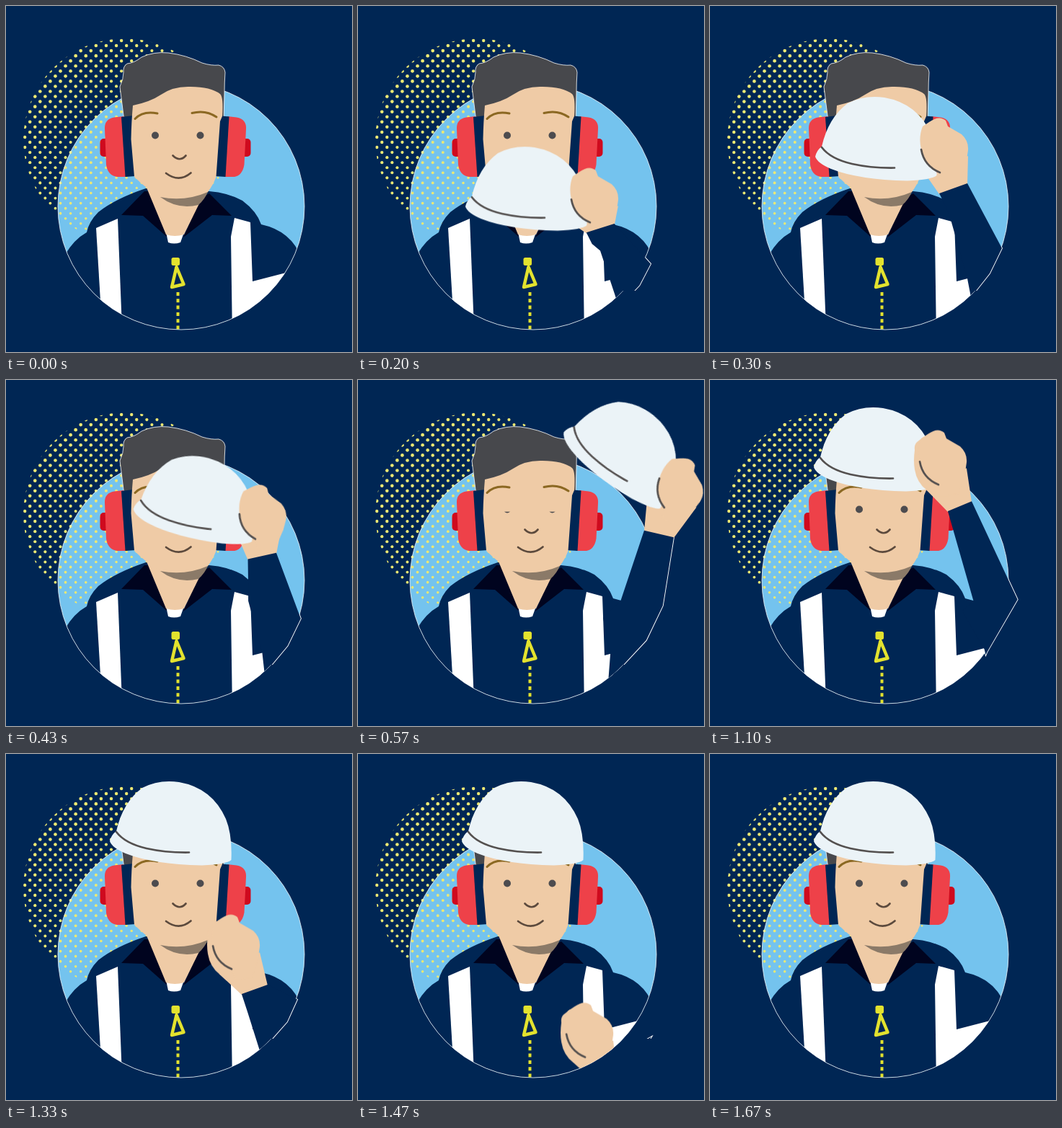
Write an HTML page that moves like this. It is 480 by 480 pixels and loops after 2730 ms.

```html
<!DOCTYPE html>
<html lang="en">
<head>
<meta charset="utf-8">
<title>Hard hat on</title>
<style>
  html, body { margin: 0; width: 100%; height: 100%; overflow: hidden; background: #002654; }
  svg { display: block; width: 100vw; height: 100vh; }

  .navy { fill: #002654; }
  .white { fill: #fff; }
  .skin { fill: #efcba6; }
  .collar { fill: #00041f; }
  .cup { fill: #ee4149; }
  .knob { fill: #cf0a1e; }
  .ink { fill: none; stroke: #54504f; stroke-width: 2.7; stroke-linecap: round; }
  .feature { stroke: #5c4a3d; }
  .brow { stroke: #8b6822; stroke-width: 3; }
  .edge { fill: none; stroke: #fff; stroke-width: 1.8; }

  .swing, .drop, .sleeve, .wrist, .lid, .thumb { animation: 2730ms linear infinite; }
  .swing { animation-name: swing; transform-origin: 153px 107px; }
  .drop { animation-name: drop; }
  .sleeve { animation-name: sleeve; }
  .wrist { animation-name: wrist; }
  .lid { animation-name: blink; }
  .thumb { animation-name: thumb; }

  /* The hat rises past the face, swings out to the side and lands on the head. */
  @keyframes swing {
    0%, 3% { transform: translate(16px, 420px) rotate(0deg); animation-timing-function: cubic-bezier(.3, .4, .5, 1); }
    11% { transform: translate(2px, 88px) rotate(0deg); }
    13% { transform: translate(2px, 88px) rotate(0deg); animation-timing-function: ease-in-out; }
    21.6% { transform: translate(149px, -44px) rotate(30deg); }
    23.4% { transform: translate(149px, -44px) rotate(30deg); animation-timing-function: ease-in; }
    26.74% { transform: translate(42px, -25px) rotate(10deg); animation-timing-function: ease-out; }
    30.4%, 100% { transform: translate(0, 0) rotate(0deg); }
  }
  @keyframes drop {
    0%, 39.5% { transform: translate(0, 0); animation-timing-function: ease-in; }
    48.7% { transform: translate(-4px, 154px); }
    58.6%, 100% { transform: translate(0, 390px); }
  }
  @keyframes sleeve {
    0%, 3% { d: path("M312 520 L350 515 L410 440 L400 450 L361 470 L352 480 L340 490 L312 520Z"); animation-timing-function: cubic-bezier(.3, .4, .5, 1); }
    11% { d: path("M318 260 L357 246 L405 336 L388 371 L362 404 L357 378 L335 300 L328 280Z"); }
    13% { d: path("M318 260 L357 246 L405 336 L388 371 L362 404 L357 378 L335 300 L328 280Z"); animation-timing-function: ease-in-out; }
    21.6% { d: path("M398 208 L439 218 L423 313 L400 361 L347 418 L350 380 L340 330 L365 306Z"); }
    23.4% { d: path("M398 208 L439 218 L423 313 L400 361 L347 418 L350 380 L340 330 L365 306Z"); animation-timing-function: ease-in; }
    26.74% { d: path("M351 184 L392 175 L426 308 L378 393 L369 402 L369 376 L350 320 L367 306Z"); animation-timing-function: ease-out; }
    30.4% { d: path("M330 180 L363 166 L427 304 L384 378 L383 381 L381 373 L350 320 L366 306Z"); }
    39.5% { d: path("M330 180 L363 166 L427 304 L384 378 L383 381 L381 373 L350 320 L366 306Z"); animation-timing-function: ease-in; }
    48.7% { d: path("M327 332 L363 319 L404 340 L390 371 L353 413 L352 411 L335 357 L327 332Z"); }
    58.6%, 100% { d: path("M312 520 L350 515 L410 440 L400 450 L361 470 L352 480 L340 490 L312 520Z"); }
  }
  @keyframes wrist {
    0%, 3% { d: path("M316 570 L372 540 L351 516 L312 521Z"); animation-timing-function: cubic-bezier(.3, .4, .5, 1); }
    11% { d: path("M302 238 L358 208 L357 248 L318 261Z"); }
    13% { d: path("M302 238 L358 208 L357 248 L318 261Z"); animation-timing-function: ease-in-out; }
    21.6% { d: path("M402 168 L471 176 L439 219 L398 209Z"); }
    23.4% { d: path("M402 168 L471 176 L439 219 L398 209Z"); animation-timing-function: ease-in; }
    26.74% { d: path("M330 149 L392 129 L390 176 L351 185Z"); animation-timing-function: ease-out; }
    30.4% { d: path("M300 150 L356 120 L363 167 L330 181Z"); }
    39.5% { d: path("M300 150 L356 120 L363 167 L330 181Z"); animation-timing-function: ease-in; }
    48.7% { d: path("M296 304 L352 274 L363 320 L327 333Z"); }
    58.6%, 100% { d: path("M300 540 L356 510 L351 516 L312 521Z"); }
  }
  @keyframes blink {
    0%, 16% { transform: translateY(0); }
    20%, 23.4% { transform: translateY(8.7px); }
    26.74% { transform: translateY(4.5px); }
    29.5%, 100% { transform: translateY(0); }
  }
  /* The thumb stays behind the brim until the hand lets go. */
  @keyframes thumb {
    0%, 39.8% { opacity: 0; }
    39.81%, 100% { opacity: 1; }
  }
</style>
</head>
<body>
<svg viewBox="0 0 480 480">
  <defs>
    <clipPath id="disc"><circle cx="243" cy="278" r="171"/></clipPath>
    <clipPath id="halo"><circle cx="165" cy="186" r="141"/></clipPath>
    <clipPath id="reach">
      <circle cx="243" cy="278" r="171"/>
      <rect width="480" height="395"/>
    </clipPath>
  </defs>
  <rect class="navy" width="480" height="480"/>

  <g clip-path="url(#reach)"><path class="sleeve edge"/></g>
  <circle cx="243" cy="278" r="171" fill="#74c3ee"/>
  <g id="dots" fill="#ece873" clip-path="url(#halo)"></g>

  <g clip-path="url(#disc)">
    <path class="navy" d="M194 253 Q152 267 128 286 Q115 299 112 314 Q94 324 82 345 V460 H410 V350 Q396 312 354 303 Q348 285 328 270 Q308 259 282 257Z"/>
    <path class="white" d="M125 308 L155 295 L161.5 460 H134Z"/>
    <path class="white" d="M317 294 L339 300 L342 382 L400 367 V460 H314 L312 320Z"/>
    <path class="collar" d="M192 257 L198 257 L224 321 L190 291 L160 290Z"/>
    <path class="collar" d="M282 260 L313 291 L286 290 L246 321 L270 266Z"/>
    <path d="M238.5 397 V449" stroke="#e3e22e" stroke-width="4" stroke-dasharray="5 4.3"/>
    <path d="M236.5 362 L230 390 L246.5 386Z" fill="none" stroke="#e3e22e" stroke-width="4.5" stroke-linejoin="round"/>
    <rect x="229.5" y="349" width="11.5" height="11" rx="2.5" fill="#e3e22e"/>
  </g>
  <circle cx="243" cy="278" r="171" fill="none" stroke="#fff" stroke-width=".9" opacity=".85"/>

  <path class="white" d="M222 314 H247 L242 328 Q233 331 225 328Z"/>
  <path class="skin" d="M195 252 L276 258 L247 317 Q234 321 222 317Z"/>
  <path d="M214 264 L281 256 Q276 268 267 276 Q238 283 214 265Z" fill="#8b7a68"/>

  <path d="M164 160 L158 112 Q163 101 163 92 Q162 84 168 80 Q178 79 188 71 Q205 63 225 65 Q250 68 272 79 Q285 83 295 82 Q303 84 304 92 Q303 105 303 122 L302 160Z" fill="#47484c" stroke="#fff" stroke-width=".8"/>

  <g>
    <rect class="knob" x="130.5" y="184" width="16" height="25" rx="5"/>
    <path class="cup" d="M163 153 L150 154.5 Q136.500 157 137 170 L139 220 Q141 235 154 237 L168 237Z"/>
    <path class="navy" d="M160 154 L176 152 L180 236 L165.5 237Z"/>
    <rect class="knob" x="324" y="184" width="15.5" height="25" rx="5"/>
    <path class="cup" d="M307 153 L320 154.5 Q334 157 333 171 L330.5 220 Q328 235 317 237 L302 237Z"/>
    <path class="navy" d="M294 152 L309.5 153.5 L304.5 237 L289 236Z"/>
  </g>

  <path class="skin" d="M176 138 Q200 133 215 123 Q232 111 256 112 Q284 112 297 122 Q302 127 300 153 L297 160 L291.5 237 Q287 249 280 258 Q248 272 214 265 Q195 254 178 237 L173.5 185 Q174 160 176 138Z"/>
  <g fill="#4d4c4f">
    <circle cx="207" cy="179.5" r="5"/>
    <circle cx="269.5" cy="179.5" r="5"/>
  </g>
  <g class="lid skin">
    <rect x="200" y="163" width="14" height="11"/>
    <rect x="262.5" y="163" width="14" height="11"/>
  </g>
  <path class="ink brow" d="M179 156.5 Q190 145 210 149"/>
  <path class="ink brow" d="M258 148.500 Q277 143.500 292 154"/>
  <path class="ink feature" d="M231.5 207.5 Q241 217 249.5 207.5"/>
  <path class="ink feature" d="M222 232 Q240 245.500 256.5 231.5"/>

  <g clip-path="url(#reach)">
    <path class="wrist skin"/>
    <g class="swing">
      <path d="M153 107 Q162 67 189 47 Q212 35 240 39 Q286 47 305 90 Q314 112 312.5 147 Q306 153 272 154.5 Q204 153 166 138 Q147 130 144 121 Q146 112 153 107Z" fill="#ebf3f7"/>
      <path class="ink" d="M153 108 Q165 124 195 131 Q222 137 254 136.5"/>
    </g>
    <g class="drop"><g class="swing">
      <path class="skin thumb" d="M296 77 L287 84 Q283 88 284 95 Q282 110 284 122 Q287 140 300 150 L310 159 H332 L325 100Z"/>
      <path class="skin" d="M293 79 L302 73 Q316 63 325 71 L328 79 L347 90 Q357 99 356 112 L354 126 L345 155 L322 158 L317 143 Q295 134 291 111 Q287 94 293 79Z"/>
      <path class="ink" d="M291 111 Q295 134 317 143"/>
    </g></g>
    <path class="sleeve navy"/>
  </g>
</svg>
<script>
  // Halftone disc: a staggered grid whose dots shrink towards the lower right.
  const dots = document.getElementById("dots");
  const step = 7.05;
  for (let row = -1; row < 41; row++) {
    for (let col = -18; col < 24; col++) {
      if ((row + col) % 2) continue;
      const x = 146 + col * step, y = 48 + row * step;
      const dot = document.createElementNS(dots.namespaceURI, "circle");
      dot.setAttribute("cx", x);
      dot.setAttribute("cy", y);
      dot.setAttribute("r", 2.4 - (x + y - 150) * .0026);
      dots.append(dot);
    }
  }
</script>
</body>
</html>
```
